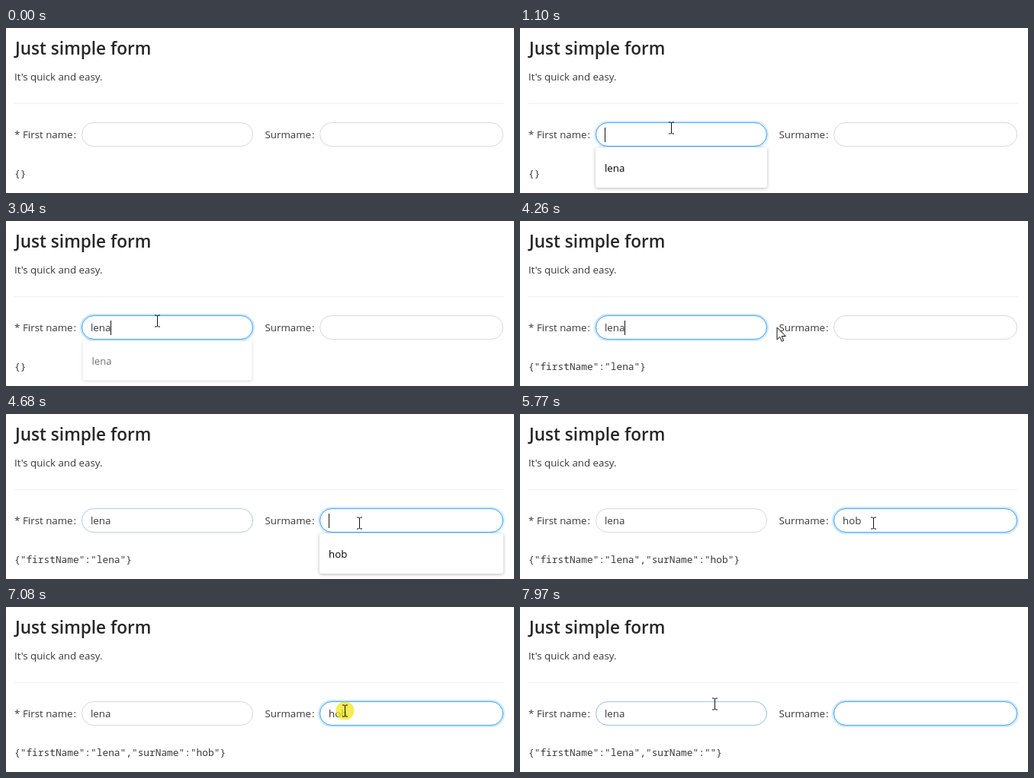
Animation, 666 px wide and 217 px high, one loop 8000 ms. Source, as an HTML page:

```html
<!DOCTYPE html>
<html lang="en">
<head>
<meta charset="utf-8">
<title>Just simple form</title>
<style>
  html, body { margin: 0; width: 100%; height: 100%; overflow: hidden; background: #fff; }
  svg { display: block; width: 666px; height: 217px; }
  text { font: 13.3px "Open Sans", sans-serif; fill: #383838; white-space: pre; }
  .title { font-size: 22.6px; font-weight: 600; fill: #262626; }
  .json { font: 12.83px "Noto Sans Mono", monospace; }
  .suggest { filter: drop-shadow(0 1px 2px rgba(0, 0, 0, .28)); }
  .suggest text { fill: #000; }
</style>
</head>
<body>
<svg viewBox="0 0 666 217">
  <text class="title" x="12" y="35">Just simple form</text>
  <text x="11" y="69">It's quick and easy.</text>
  <path d="M11 99.5H652" stroke="#f0f0f0"/>
  <text x="11" y="145">*</text>
  <text x="22" y="145">First name<tspan dx="1">:</tspan></text>
  <text x="339.5" y="145">Surmame<tspan dx="1">:</tspan></text>
  <text class="json" id="json" x="11" y="196"></text>
  <g id="fields"></g>
  <g id="cursor">
    <circle id="click" r="12" fill="#f2e61c" opacity=".75"/>
    <path id="beam" d="M-3.5-7.5H-1L0-6.5 1-7.5H3.5M0-6.5V6.5M-3.5 7.5H-1L0 6.5 1 7.5H3.5" fill="none" stroke="#111"/>
    <path id="arrow" d="M.5.5V16.5L4.3 13 6.8 18.8 9.2 17.8 6.7 12H11.8Z" fill="#fff" stroke="#111"/>
  </g>
</svg>
<script>
const LOOP = 8000, STEP = 70, BLINK = 530, SAVE_DELAY = 540;
const $ = id => document.getElementById(id);
const clamp = v => Math.max(0, Math.min(1, v));
const show = (el, on) => el.setAttribute('visibility', on ? 'visible' : 'hidden');

function add(parent, tag, attrs = {}) {
  const el = document.createElementNS('http://www.w3.org/2000/svg', tag);
  for (const key in attrs) el.setAttribute(key, attrs[key]);
  return parent.appendChild(el);
}

const start = { x: 385, y: 193 };
// Each move goes on from where the last one ended; bend bows its middle.
const moves = [
  { from: 400, to: 820, x: 198, y: 131, bend: 0 },
  { from: 3780, to: 3850, x: 209, y: 131, bend: 0 },
  { from: 4050, to: 4470, x: 463, y: 143, bend: 2 },
  { from: 5840, to: 6520, x: 205, y: 145, bend: 7 },
  { from: 6590, to: 7010, x: 444, y: 136, bend: 10 },
  { from: 7420, to: 7910, x: 255, y: 127, bend: -35 }
];

const fields = [
  { name: 'firstName', word: 'lena', x: 99, width: 225, focus: 960, blur: 4540, keys: [2040, 2310, 2710, 2970] },
  { name: 'surName', word: 'hob', x: 411, width: 241, focus: 4540, blur: LOOP, keys: [4950, 5150, 5220], select: 7220, clear: 7420 }
];
const clicks = [960, 4540, 7080];

function cursorAt(t) {
  const i = moves.findLastIndex(m => m.from <= t);
  if (i < 0) return null;
  const m = moves[i], a = moves[i - 1] || start;
  const k = clamp(STEP * Math.floor((t - m.from) / STEP) / (m.to - m.from));
  const eased = k * k * (3 - 2 * k);
  return {
    x: Math.round(a.x + (m.x - a.x) * eased),
    y: Math.round(a.y + (m.y - a.y) * eased + m.bend * 4 * eased * (1 - eased))
  };
}

const isOver = (f, p) => p && p.y > 124 && p.y < 156 && p.x >= f.x && p.x <= f.x + f.width;
const isFocused = (f, t) => t >= f.focus && t < f.blur;
const typedCount = (f, t) => t >= f.clear ? 0 : f.keys.filter(key => key <= t).length;

// A transition is the mean of its on/off state over the last moments.
function fade(isOn, t, samples = 10, gap = 20) {
  let sum = 0;
  for (let i = 0; i < samples; i++) sum += isOn(t - i * gap) ? 1 : 0;
  return sum / samples;
}

// The form saves once typing has paused.
function savedForm(t) {
  const form = {};
  for (const f of fields) {
    if (t >= f.keys.at(-1) + SAVE_DELAY) form[f.name] = t >= f.clear + SAVE_DELAY ? '' : f.word;
  }
  return JSON.stringify(form);
}

for (const f of fields) {
  const { x, width, word } = f, root = $('fields');
  f.glow = add(root, 'rect', { x: x - 1, y: 123, width: width + 2, height: 34, rx: 17, fill: 'none', stroke: '#1890ff', 'stroke-width': 2 });
  const border = { x: x + .5, y: 124.5, width: width - 1, height: 31, rx: 15.5 };
  add(root, 'rect', { ...border, fill: '#fff', stroke: '#d9d9d9' });
  f.active = add(root, 'rect', { ...border, fill: 'none', stroke: '#40a9ff' });
  f.mark = add(root, 'rect', { x: x + 12, y: 129, height: 22, fill: '#1890ff' });
  f.text = add(root, 'text', { x: x + 12, y: 145 });
  f.caret = add(root, 'rect', { y: 131, width: 1, height: 19, fill: '#111' });
  f.suggest = add(root, 'g', { class: 'suggest' });
  add(f.suggest, 'rect', { x, y: 157, width, height: 53, rx: 3, fill: '#fff' });
  add(f.suggest, 'text', { x: x + 12, y: 189 }).textContent = word;
}

function drawField(f, t) {
  f.glow.setAttribute('opacity', .22 * fade(s => isFocused(f, s), t));
  f.active.setAttribute('opacity', fade(s => isFocused(f, s) || isOver(f, cursorAt(s)), t));

  f.text.textContent = f.word.slice(0, typedCount(f, t));
  const length = f.text.textContent ? f.text.getComputedTextLength() : 0;
  const selected = t >= f.select && t < f.clear;
  f.mark.setAttribute('width', selected ? length : 0);
  f.text.style.fill = selected ? '#fff' : '';

  const lastEdit = Math.max(...[f.focus, ...f.keys, f.clear].filter(time => time <= t));
  f.caret.setAttribute('x', Math.round(f.x + 12 + length));
  show(f.caret, isFocused(f, t) && !selected && (t - lastEdit) % (2 * BLINK) < BLINK);

  const closing = clamp((t - f.keys.at(-1)) / 210);
  const scale = 1 - .045 * closing, cx = f.x + f.width / 2, cy = 184;
  f.suggest.setAttribute('opacity', clamp((t - f.focus) / 140) * clamp(1 - 1.3 * closing));
  f.suggest.setAttribute('transform', `translate(${cx} ${cy}) scale(${scale}) translate(${-cx} ${-cy})`);
}

function drawCursor(t) {
  const p = cursorAt(t), overField = fields.some(f => isOver(f, p));
  show($('beam'), overField);
  show($('arrow'), p && !overField);
  show($('click'), clicks.some(time => t >= time && t < time + 2 * STEP));
  if (p) $('cursor').setAttribute('transform', `translate(${p.x + .5} ${p.y + .5})`);
}

const begin = performance.now();
function draw() {
  const t = (performance.now() - begin) % LOOP;
  $('json').textContent = savedForm(t);
  fields.forEach(f => drawField(f, t));
  drawCursor(t);
  requestAnimationFrame(draw);
}
draw();
</script>
</body>
</html>
```
